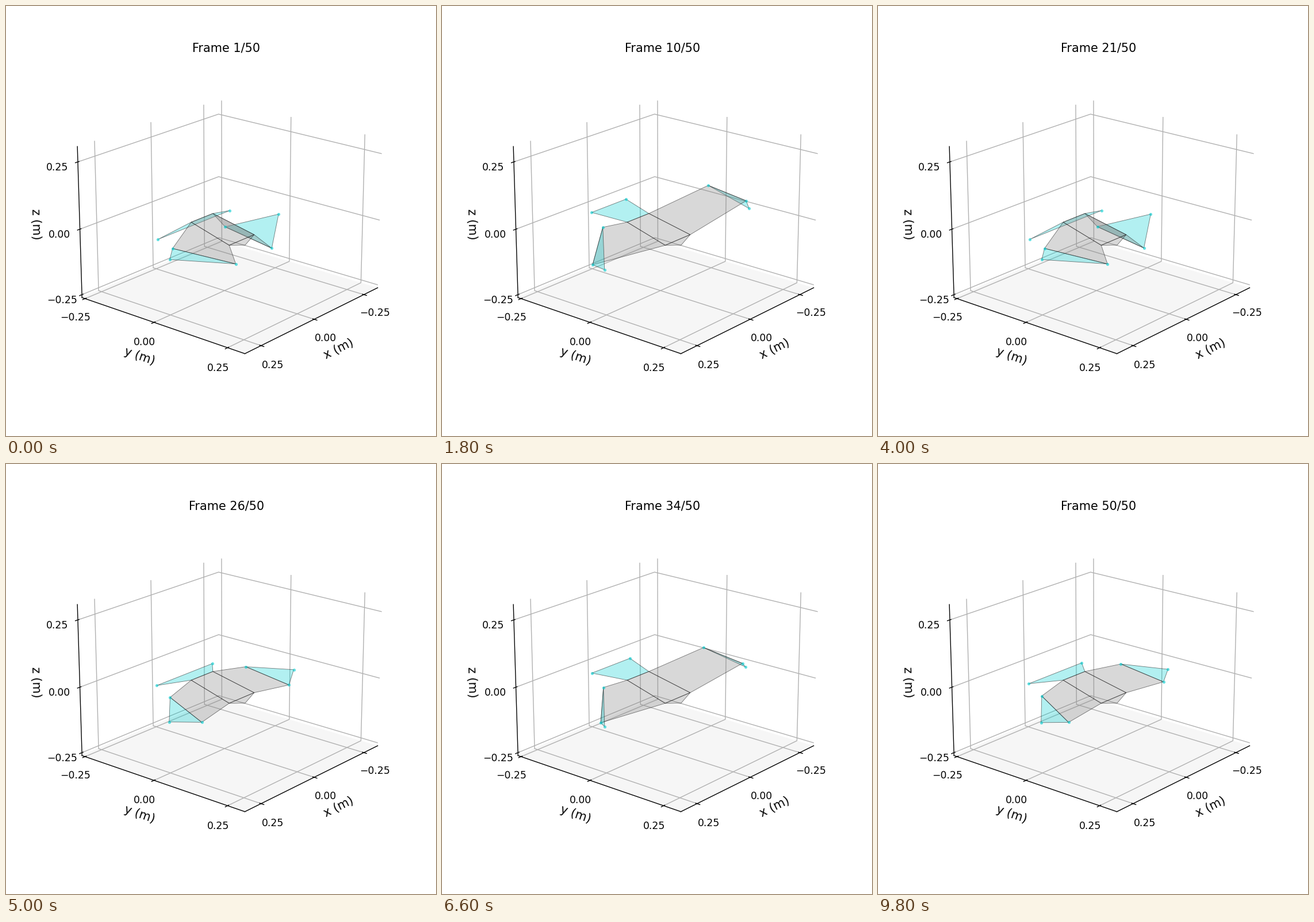
A matplotlib script for the animation above (10000 ms loop, 748 px wide and 748 px high).

```python
import numpy as np
import matplotlib.pyplot as plt
from matplotlib.animation import FuncAnimation
from mpl_toolkits.mplot3d.art3d import Poly3DCollection

FRAMES = 50
PERIOD = 20.4       # frames per oscillation
LAST_MOVING = 36
REST = -0.027

GRAY = (0.5, 0.5, 0.5, 0.3)
TURQUOISE = (0, 206 / 255, 209 / 255, 0.3)

# One half of the body; the other half is its mirror in x.
FRONT = np.array([0.0509, -0.0789, -0.0058])
BACK = np.array([0.0592, 0.0605, -0.0459])
TAIL = np.array([0.0, 0.0721, -0.0619])

# Mean position and displacement of each moving node.
NODES = {
    "lead": ([0.1879, -0.0488, -0.0092], [0.0638, 0.0407, 0.0758]),
    "trail": ([0.2289, 0.0723, -0.0543], [0.1432, -0.0303, 0.0387]),
    "tip": ([0.3012, 0.0381, -0.0417], [0.0440, 0.0326, 0.0073]),
    "nose": ([0.1230, -0.1468, -0.0155], [-0.0457, -0.0403, 0.0255]),
}


def mirror(p):
    return p * [-1, 1, 1]


def swing(i):
    if i > LAST_MOVING:
        return REST
    return -np.cos(2 * np.pi * i / PERIOD)


def shape(s):
    p = {k: np.array(mean) + s * np.array(mode)
         for k, (mean, mode) in NODES.items()}
    faces = [[FRONT, mirror(FRONT), mirror(BACK), BACK],
             [BACK, TAIL, mirror(BACK)]]
    wing = [FRONT, BACK, p["trail"], p["lead"]]
    end = [p["lead"], p["trail"], p["tip"]]
    for part in (wing, end):
        faces += [part, [mirror(q) for q in part]]
    faces.append([FRONT, mirror(FRONT), mirror(p["nose"]), p["nose"]])
    dots = [f(q) for q in p.values() for f in (np.array, mirror)]
    return faces, np.array(dots)


def padded(lo, hi):
    pad = (hi - lo) / 48
    return lo - pad, hi + pad


fig = plt.figure(figsize=(6, 6), dpi=748 / 6)
ax = fig.add_subplot(projection="3d")
ax.view_init(elev=20, azim=40)
ax.set(xlim=padded(-0.31, 0.31), ylim=padded(-0.25, 0.295),
       zlim=padded(-0.25, 0.295))
ticks = [-0.25, 0, 0.25]
ax.set(xticks=ticks, yticks=ticks, zticks=ticks)
ax.set_xlabel("x (m)", fontsize=12)
ax.set_ylabel("y (m)", fontsize=12)
ax.set_zlabel("z (m)", fontsize=12)
for axis in (ax.xaxis, ax.yaxis):
    axis.set_pane_color((1, 1, 1, 0))
ax.zaxis.set_pane_color((0.965, 0.965, 0.965, 1))
title = ax.set_title("")

faces, dots = shape(swing(0))
colors = [GRAY] * 4 + [TURQUOISE] * 3
mesh = Poly3DCollection(faces, facecolors=colors,
                        edgecolors=[(0, 0, 0, 0.5)] * len(faces),
                        linewidths=0.5)
ax.add_collection3d(mesh)
marks, = ax.plot(*dots.T, "o", color=TURQUOISE[:3], alpha=0.6,
                 markersize=3, markeredgewidth=0, zorder=10)
# plotting the markers must not widen the view
ax.set(xlim=padded(-0.31, 0.31), ylim=padded(-0.25, 0.295),
       zlim=padded(-0.25, 0.295))


def update(i):
    faces, dots = shape(swing(i))
    mesh.set_verts(faces)
    marks.set_data_3d(*dots.T)
    title.set_text(f"Frame {i + 1}/{FRAMES}")
    return mesh, marks, title


anim = FuncAnimation(fig, update, frames=FRAMES, interval=200,
                     repeat=True, repeat_delay=0, blit=False)
plt.show()
```
